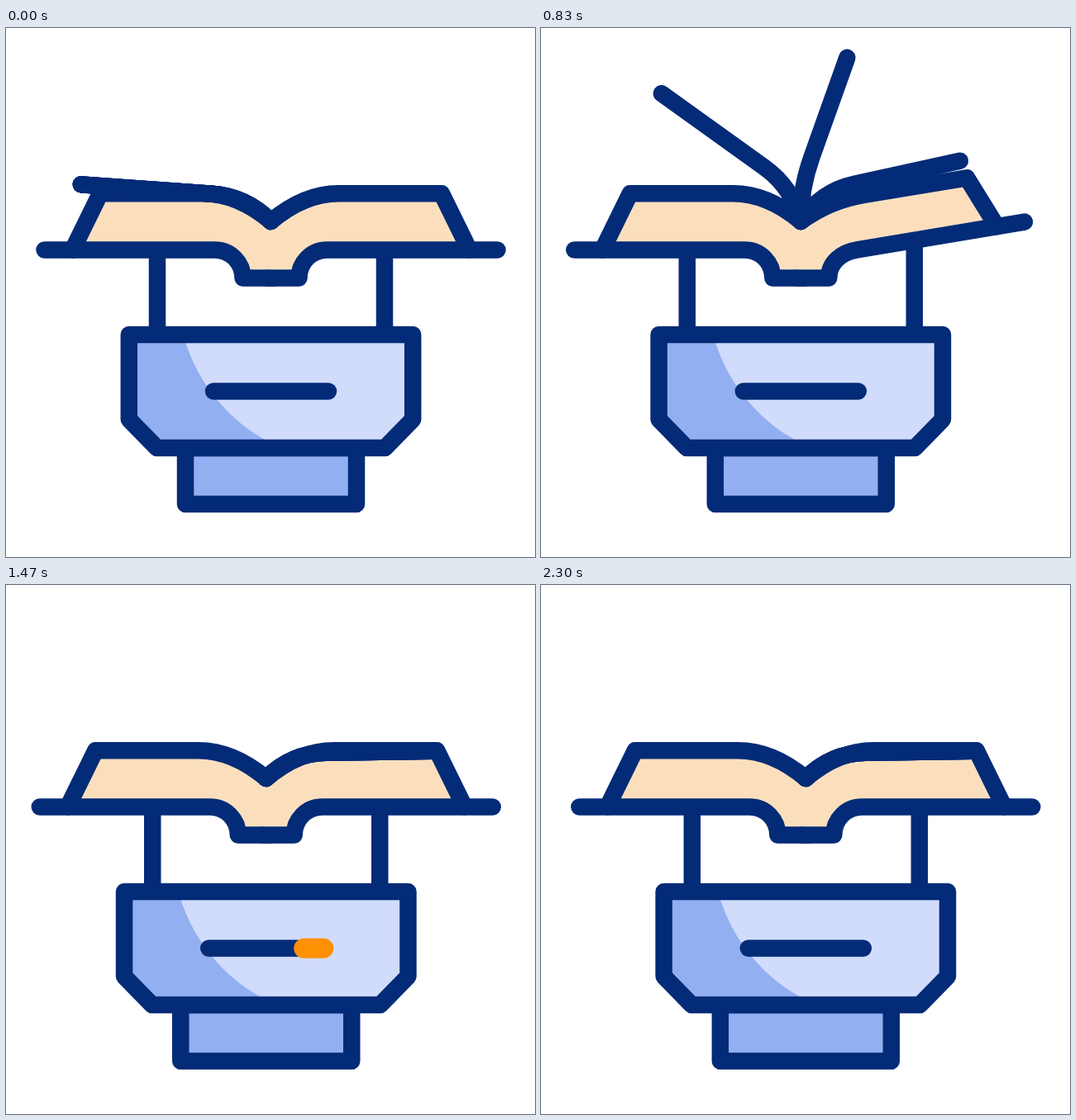
Write an HTML page with a canvas that moves like this. It is 640x640 px and loops after 2.33 s.

```html
<!DOCTYPE html>
<html lang="en">
<head>
<meta charset="utf-8">
<style>
  html, body { margin: 0; width: 100%; height: 100%; overflow: hidden; background: #fff; }
  canvas { display: block; }
</style>
</head>
<body>
<canvas id="stage" width="640" height="640"></canvas>
<script>
const ctx = document.getElementById('stage').getContext('2d');
const NAVY = '#042b77', LIGHT = '#d1dbfb', SHADE = '#92aff1', PAPER = '#fbdfbd', ORANGE = '#fd9003';
const LOOP = 2330, FPS = 30, STROKE = 20.5;
const SPINE = 234, BAR = 268.4, TOP = 200.2, GUTTER = 302.6;
const LIFT = .18;                                  // slope of a fully raised wing
const SWAY = [0, 28, -27, 14.6, -13, 8, -7, 0];    // turning points, ten ticks apart

// Times are in ticks of 1/30 s.
const mix = (a, b, u) => a + (b - a) * u;
const ease = u => (1 - Math.cos(Math.PI * Math.min(1, Math.max(0, u)))) / 2;
const ramp = (t, from, to) => ease((t - from) / (to - from));

function polar(angle, radius) {
  const a = angle * Math.PI / 180;
  return [-Math.cos(a) * radius, SPINE - Math.sin(a) * radius];
}

const spineAngle = ([x, y]) => Math.atan2(SPINE - y, -x) * 180 / Math.PI;

// Point past b on the line from a, by the given distance.
function beyond(a, b, dist) {
  const len = Math.hypot(b[0] - a[0], b[1] - a[1]);
  return [b[0] + (b[0] - a[0]) / len * dist, b[1] + (b[1] - a[1]) / len * dist];
}

function trace(points) {
  ctx.beginPath();
  points.forEach(p => ctx.lineTo(...p));
}

function paint(fill) {
  if (fill) {
    ctx.fillStyle = fill;
    ctx.fill();
  }
  ctx.strokeStyle = NAVY;
  ctx.lineWidth = STROKE;
  ctx.stroke();
}

function line(points) {
  trace(points);
  paint();
}

function leaf(bend, tip) {
  ctx.beginPath();
  ctx.moveTo(0, SPINE);
  ctx.quadraticCurveTo(...beyond(tip, bend, 42), ...bend);
  ctx.lineTo(...tip);
}

// A raised wing is sheared upwards and drawn in a little towards the spine.
function makeWing(side, slope, barIn, topIn, topPivot) {
  const bar = x => [side * (x - slope * barIn * (x - 68) / 206), BAR - slope * (x - 68)];
  const top = x => [side * (x - slope * topIn), TOP - slope * (x - topPivot)];
  return { side, end: bar(274), foot: bar(240), low: bar(68), corner: top(206.5), bend: top(82) };
}

function drawWing({ side, end, foot, low, corner, bend }) {
  line([[side * 137.5, mix(low[1], end[1], 1 / 3)], [side * 137.5, 371]]);
  leaf(bend, corner);
  ctx.lineTo(...foot);
  ctx.lineTo(...low);
  ctx.bezierCurveTo(...beyond(end, low, 19), side * 34, GUTTER - 19, side * 34, GUTTER);
  ctx.lineTo(-side * 4, GUTTER);
  paint(PAPER);
  line([foot, end]);
}

function drawPage(age, left, right) {
  const turn = ramp(age, 0, 15), swing = Math.cos(Math.PI * turn);
  const angle = mix(11, 170.7, turn);
  if (angle <= spineAngle(left.corner) || angle >= spineAngle(right.corner)) return;
  const bendAngle = angle + 14 * Math.cos(Math.PI * ease(turn));
  leaf(polar(bendAngle, 79), polar(angle, 206 + 28 * Math.max(0, swing)));
  paint();
}

function drawStand(t) {
  trace([[-103.5, 508], [103.5, 508], [103.5, 576], [-103.5, 576]]);
  ctx.closePath();
  paint(SHADE);

  const body = [[-171.7, 371], [171.7, 371], [171.7, 473.5], [138, 508], [-138, 508], [-171.7, 473.5]];
  trace(body);
  ctx.closePath();
  ctx.fillStyle = SHADE;
  ctx.fill();
  ctx.save();
  ctx.clip();
  ctx.beginPath();
  ctx.arc(96.4, 315.7, 210, 0, 2 * Math.PI);
  ctx.fillStyle = LIGHT;
  ctx.fill();
  ctx.restore();
  trace(body);
  ctx.closePath();
  paint();

  const dash = u => [mix(-69.5, 69.5, u), 439.5];
  line([dash(0), dash(1)]);
  const head = ramp(t, 31.5, 41.5), tail = ramp(t, 36, 47);
  if (head > tail) {
    trace([dash(tail), dash(head)]);
    ctx.strokeStyle = ORANGE;
    ctx.lineWidth = 24;
    ctx.stroke();
  }
}

function draw(t) {
  const beat = Math.floor(t / 10);
  ctx.setTransform(1, 0, 0, 1, 0, 0);
  ctx.clearRect(0, 0, 640, 640);
  ctx.translate(320.5 + mix(SWAY[beat], SWAY[beat + 1], ease(t / 10 - beat)), 0);
  ctx.lineCap = ctx.lineJoin = 'round';

  const liftL = ramp(t, 2, 14) - ramp(t, 14, 22);
  const liftR = ramp(t, 6, 16) - ramp(t, 23, 33.5) + .15 * (ramp(t, 45, 50) - ramp(t, 50, 57));
  const left = makeWing(-1, LIFT * liftL, 65, 15, 60);
  const right = makeWing(1, LIFT * liftR, 20, 34, 92);
  drawWing(left);
  drawWing(right);
  drawStand(t);
  for (let i = 0; i < 4; i++) drawPage(t - 8.6 - 4 * i, left, right);
}

function tick() {
  draw(Math.floor((performance.now() % LOOP + 5) * FPS / 1000));
  requestAnimationFrame(tick);
}
tick();
</script>
</body>
</html>
```
